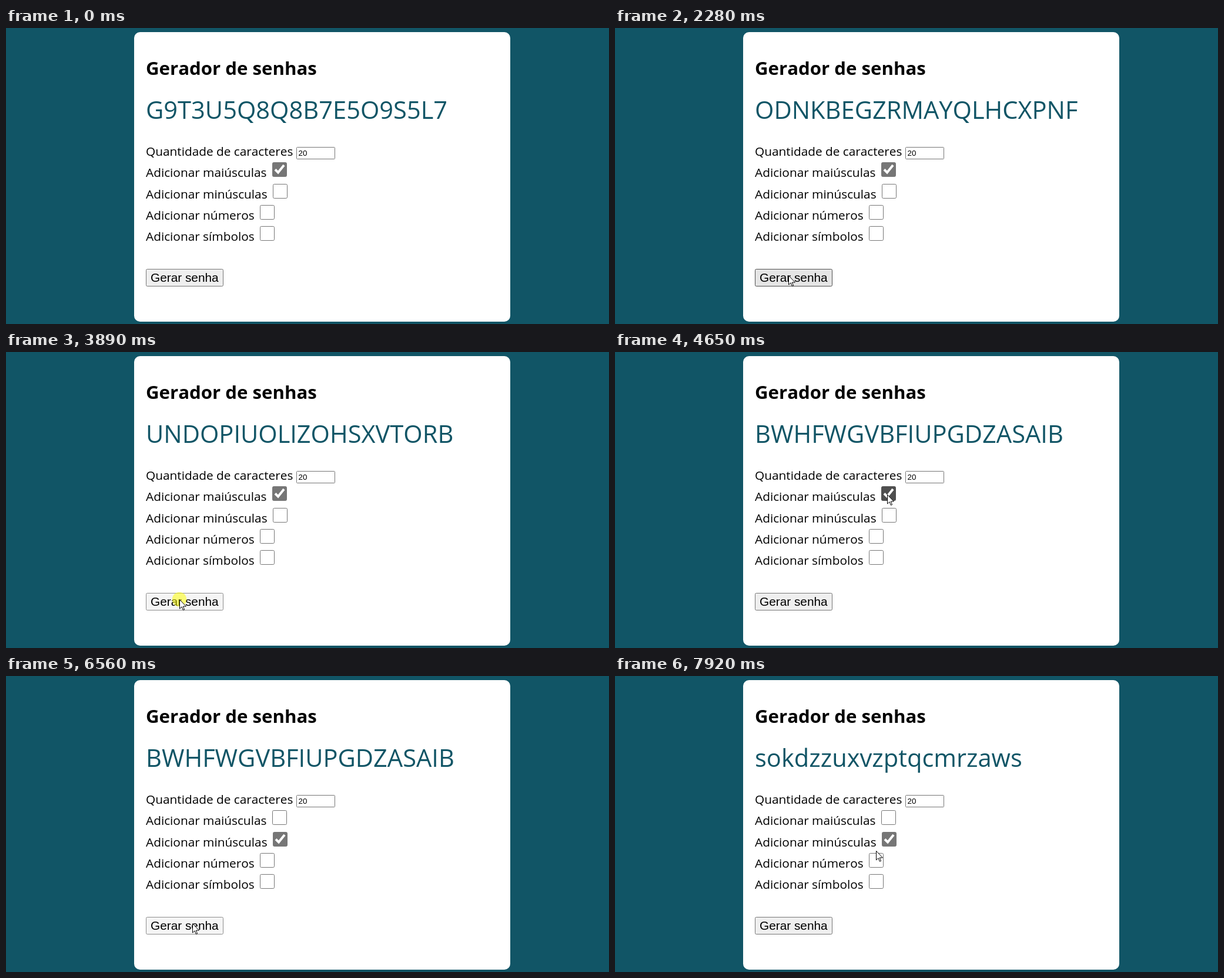
Animation, 1026 px wide and 505 px high, one loop 7.99 s. Source, as an HTML page:

```html
<!DOCTYPE html>
<html lang="pt">
<head>
<meta charset="utf-8">
<title>Gerador de senhas</title>
<style>
html, body { margin: 0; width: 100%; height: 100%; overflow: hidden; background: #156; }
svg { display: block; width: 1026px; height: 505px; font: 20.8px "Open Sans", sans-serif; font-kerning: none; }
.title { font-size: 31.2px; font-weight: 700; }
.password { font-size: 41.6px; fill: #156; }
.button { font-family: "Liberation Sans", Arial, sans-serif; }
.input { font: 13.33px "Liberation Sans", Arial, sans-serif; }
</style>
</head>
<body>
<svg viewBox="0 0 1026 505">
  <rect width="1026" height="505" fill="#156"/>
  <rect x="218" y="7" width="640" height="494" rx="10" fill="#fff"/>
  <text class="title" x="238" y="80">Gerador de senhas</text>
  <text class="password" id="password" x="238" y="155"></text>
  <text x="238" y="218">Quantidade de caracteres</text>
  <rect x="494.5" y="203.5" width="65" height="20" rx="1" fill="#fff" stroke="#767676"/>
  <text class="input" x="497.5" y="218">20</text>
  <g id="options"></g>
  <rect id="button" x="238.5" y="411.5" width="131" height="29" rx="2"/>
  <text class="button" x="246" y="433">Gerar senha</text>
  <circle id="glow" r="12.3" fill="#ff0" fill-opacity=".52"/>
  <path id="cursor" d="M.5 .5V16L4 12.7 6.4 18.4 8.6 17.5 6.2 12H11.4Z" fill="#fff" stroke="#000" stroke-linejoin="round"/>
</svg>
<script>
const LOOP = 7990, STEP = 67;
const LIT = 60, HELD = 120; // how long a click glows and stays down
const LEFT = 238, BOX = 25;

const labels = ["maiúsculas", "minúsculas", "números", "símbolos"];
const firstPassword = "G9T3U5Q8Q8B7E5O9S5L7";

// click time and the password it produces
const generations = [
  [1630, "KDTRSEMBYALQZFHXLPNG"],
  [2150, "ODNKBEGZRMAYQLHCXPNF"],
  [2610, "HUYOEZIYQBWFUWUBDWDV"],
  [3070, "QMXREHDAPLNZCYBGOXFN"],
  [3490, "UNDOPIUOLIZOHSXVTORB"],
  [3890, "BWHFWGVBFIUPGDZASAIB"],
  [6490, "tkeoqhfjxrvdnliyspcb"],
  [6980, "vgxbjuuzziwgbifqabwf"],
  [7250, "sokdzzuxvzptqcmrzaws"]
];
const uppercaseOff = 4920, lowercaseOn = 5530;
const clicks = [...generations.map(g => g[0]), uppercaseOff, lowercaseOn];

// pointer moves: start, end, destination
const entry = { x: 558, y: 467 };
const moves = [
  { from: 310, to: 590, x: 335, y: 408 },
  { from: 790, to: 1540, x: 295, y: 422 },
  { from: 4020, to: 4720, x: 468, y: 238 },
  { from: 5060, to: 5460, x: 467, y: 280 },
  { from: 5660, to: 6420, x: 317, y: 422 },
  { from: 7380, to: 7920, x: 444, y: 298 }
];

const byId = id => document.getElementById(id);
const visible = on => on ? "visible" : "hidden";
const ease = k => k * k * (3 - 2 * k);

function set(node, attrs) {
  for (const key in attrs) node.setAttribute(key, attrs[key]);
}

function add(tag, attrs, text = "") {
  const node = document.createElementNS("http://www.w3.org/2000/svg", tag);
  set(node, attrs);
  node.textContent = text;
  return byId("options").appendChild(node);
}

const boxes = labels.map((label, i) => {
  const baseline = Math.round(254.4 + 36.3 * i);
  const text = add("text", { x: LEFT, y: baseline }, "Adicionar " + label);
  const x = Math.round(LEFT + text.getComputedTextLength() + 9.6), y = baseline - BOX;
  return {
    x, y,
    frame: add("rect", { x: x + .5, y: y + .5, width: BOX - 1, height: BOX - 1, rx: 2 }),
    tick: add("path", { d: `M${x + 5} ${y + 12.5}l5 5L${x + 20} ${y + 5}`, fill: "none", stroke: "#fff", "stroke-width": 4 })
  };
});

function pointerAt(t) {
  let at = entry;
  for (const { from, to, x, y } of moves) {
    if (t < from) break;
    const steps = Math.round((to - from) / STEP);
    const k = ease(Math.min(1, Math.floor((t - from) / (to - from) * steps) / steps));
    at = { x: Math.round(at.x + (x - at.x) * k), y: Math.round(at.y + (y - at.y) * k) };
  }
  return at;
}

function render(t) {
  const tip = pointerAt(t);
  const shown = t >= moves[0].from;
  const within = span => clicks.some(down => t >= down && t < down + span);
  const released = down => t >= down + HELD;
  const pressed = within(HELD);
  const over = (x, y, w, h) => shown && tip.x >= x && tip.x < x + w && tip.y >= y && tip.y < y + h;
  const shade = (hovered, normal, hover, active) => !hovered ? normal : pressed ? active : hover;
  const edge = hovered => shade(hovered, "#767676", "#4f4f4f", "#8d8d8d");

  const latest = generations.findLast(([down]) => released(down));
  byId("password").textContent = latest ? latest[1] : firstPassword;

  const checked = [!released(uppercaseOff), released(lowercaseOn)];
  boxes.forEach(({ x, y, frame, tick }, i) => {
    const color = edge(over(x, y, BOX, BOX));
    set(frame, { stroke: color, fill: checked[i] ? color : "#fff" });
    set(tick, { visibility: visible(checked[i]) });
  });

  const onButton = over(LEFT, 411, 132, 30);
  set(byId("button"), { fill: shade(onButton, "#efefef", "#e5e5e5", "#f5f5f5"), stroke: edge(onButton) });
  set(byId("glow"), { cx: tip.x, cy: tip.y, visibility: visible(within(LIT)) });
  set(byId("cursor"), { transform: `translate(${tip.x} ${tip.y})`, visibility: visible(shown) });
}

let start;
function tick(now) {
  start ??= now;
  render((now - start) % LOOP);
  requestAnimationFrame(tick);
}
render(0);
requestAnimationFrame(tick);
</script>
</body>
</html>
```
